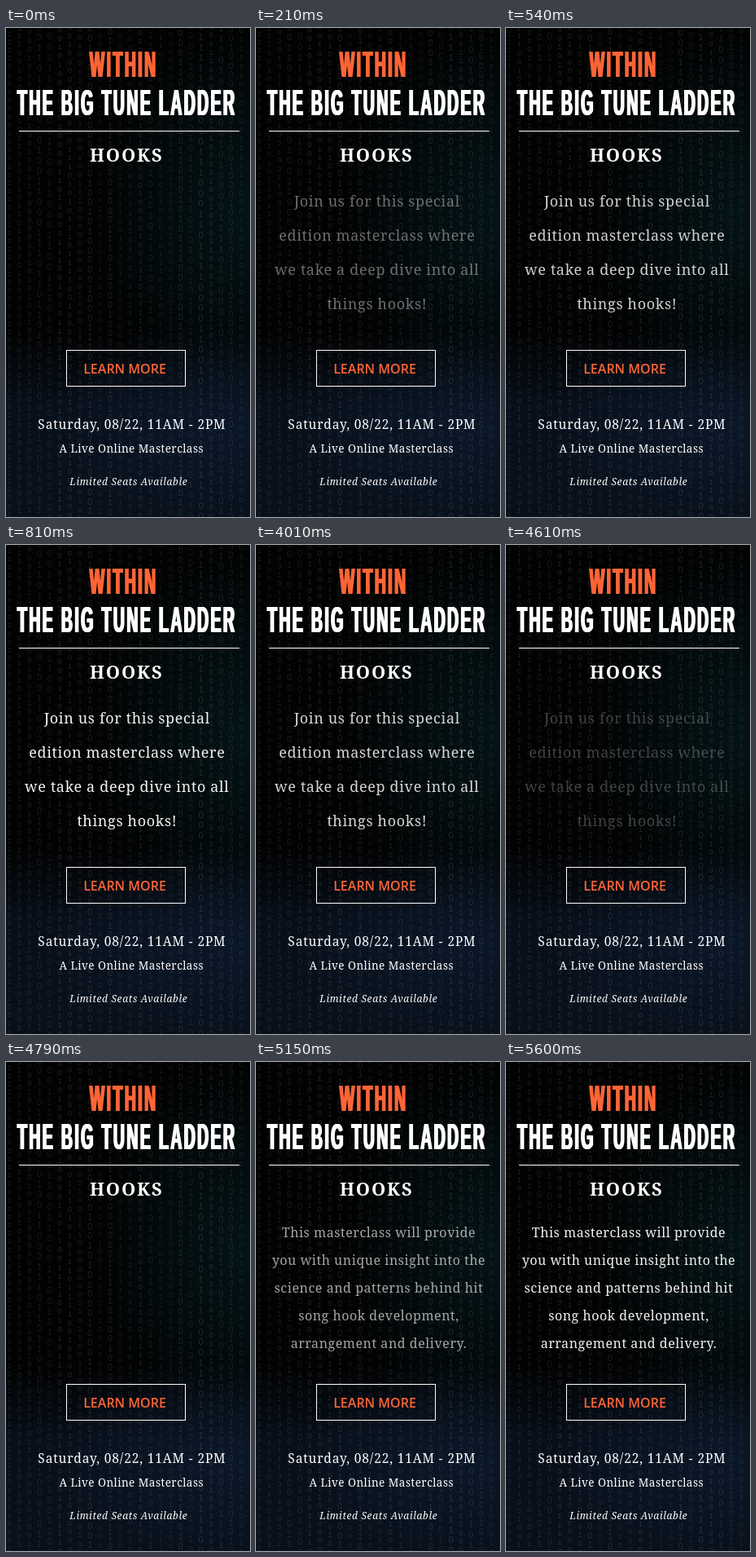
These frames come from a looping animation (300x600 px, 8 s). An HTML page with a canvas:

```html
<!DOCTYPE html>
<html lang="en">
<head>
<meta charset="utf-8">
<title>Masterclass banner</title>
<style>
html, body { margin: 0; width: 100%; height: 100%; overflow: hidden; background: #020202; }
canvas { display: block; }
</style>
</head>
<body>
<canvas id="stage" width="300" height="600"></canvas>
<script>
const W = 300, H = 600, LOOP = 8000;
const SERIF = '"Noto Serif", serif';
const ORANGE = '#ff6536';
const ctx = document.getElementById('stage').getContext('2d');

const clamp = v => Math.max(0, Math.min(1, v));

function text(c, str, x, y, font, spacing = 0, color = '#fff') {
  c.font = font;
  c.letterSpacing = spacing + 'px';
  c.textAlign = 'center';
  c.fillStyle = color;
  c.fillText(str, x + spacing / 2, y);
}

// Condensed display face: narrow letters with heavy stems.
function headline(c, str, x, y, color) {
  const narrow = 0.44;
  for (const dx of [-0.9, 0, 0.9]) {
    c.save();
    c.translate(x + dx, y);
    c.scale(narrow, 1);
    text(c, str, 0, 0, 'bold 44px "Liberation Sans", Arial, sans-serif', 5.6, color);
    c.restore();
  }
}

function glow(c, x, y, rx, ry, rgb, alpha) {
  c.save();
  c.translate(x, y);
  c.scale(rx, ry);
  const g = c.createRadialGradient(0, 0, 0, 0, 0, 1);
  g.addColorStop(0, `rgba(${rgb},${alpha})`);
  g.addColorStop(0.5, `rgba(${rgb},${alpha * 0.55})`);
  g.addColorStop(1, `rgba(${rgb},0)`);
  c.fillStyle = g;
  c.fillRect(-1, -1, 2, 2);
  c.restore();
}

function digitRain(c) {
  let seed = 41;
  const random = () => (seed = (seed * 16807) % 2147483647) / 2147483647;
  for (let x = 4; x < W; x += 12.4) {
    const size = 9 + random() * 2.5;
    const shade = 0.1 + random() * 0.07;
    for (let y = random() * 10; y < H + 10; y += size * 1.13) {
      text(c, random() < 0.55 ? '0' : '1', x, y, `${size}px "Liberation Sans", sans-serif`,
        0, `rgba(205,215,220,${shade})`);
    }
  }
}

function makeBackdrop() {
  const layer = document.createElement('canvas');
  layer.width = W;
  layer.height = H;
  const c = layer.getContext('2d');
  c.fillStyle = '#020202';
  c.fillRect(0, 0, W, H);

  const floor = c.createLinearGradient(0, 370, 0, H);
  floor.addColorStop(0, 'rgba(9,19,33,0)');
  floor.addColorStop(0.4, 'rgba(9,19,33,.75)');
  floor.addColorStop(1, 'rgba(9,19,31,.85)');
  c.fillStyle = floor;
  c.fillRect(0, 370, W, H - 370);
  glow(c, 295, 230, 190, 240, '4,27,32', 0.7);
  glow(c, 270, 490, 230, 120, '13,29,50', 0.6);
  digitRain(c);

  headline(c, 'WITHIN', 143.5, 60, ORANGE);
  headline(c, 'THE BIG TUNE LADDER', 147.5, 107, '#fff');
  c.fillStyle = '#fff';
  c.fillRect(16, 126, 271, 1);
  text(c, 'HOOKS', 147.5, 164, `600 22px ${SERIF}`, 1.8);

  c.strokeStyle = '#fff';
  c.lineWidth = 1;
  c.strokeRect(74.5, 395.5, 146, 44);
  text(c, 'LEARN MORE', 146, 424, '600 16px "Open Sans", sans-serif', 0, ORANGE);

  text(c, 'Saturday, 08/22, 11AM - 2PM', 154.5, 492, `500 15.5px ${SERIF}`, 0.85);
  text(c, 'A Live Online Masterclass', 154, 521, `500 13.5px ${SERIF}`, 0.45);
  text(c, 'Limited Seats Available', 150.5, 561, `italic 500 12px ${SERIF}`, 0.65);
  return layer;
}

const invite = {
  lines: ['Join us for this special', 'edition masterclass where',
    'we take a deep dive into all', 'things hooks!'],
  x: 148.5, y: 219, leading: 42, size: 18, spacing: 0.65
};
const summary = {
  lines: ['This masterclass will provide', 'you with unique insight into the',
    'science and patterns behind hit', 'song hook development,', 'arrangement and delivery.'],
  x: 150.7, y: 214.5, leading: 34, size: 16, spacing: 0.55
};

function paragraph(p, alpha) {
  if (alpha <= 0) return;
  ctx.globalAlpha = alpha;
  p.lines.forEach((line, i) =>
    text(ctx, line, p.x, p.y + i * p.leading, `${p.size}px ${SERIF}`, p.spacing, '#f2f2f2'));
  ctx.globalAlpha = 1;
}

// Fades advance in discrete steps, in milliseconds.
const elapsed = (t, start, step) => Math.floor((t - start) / step) * step;

function fadeIn(t, start, step) {
  const p = clamp((elapsed(t, start, step) + 20) / 800);
  return 1 - (1 - p) ** 2;
}

// Eases out to nothing over 780 ms.
function fadeOut(t, start, step) {
  return t < start ? 1 : 0.88 * clamp(1 - elapsed(t, start, step) / 780) ** 0.85;
}

const backdrop = makeBackdrop();

function draw(now) {
  const t = now % LOOP;
  ctx.drawImage(backdrop, 0, 0);
  paragraph(invite, fadeIn(t, 30, 60) * fadeOut(t, 4010, 60));
  paragraph(summary, fadeIn(t, 4820, 66));
}

const begin = performance.now();
function tick() {
  draw(performance.now() - begin);
  requestAnimationFrame(tick);
}
tick();
</script>
</body>
</html>
```
